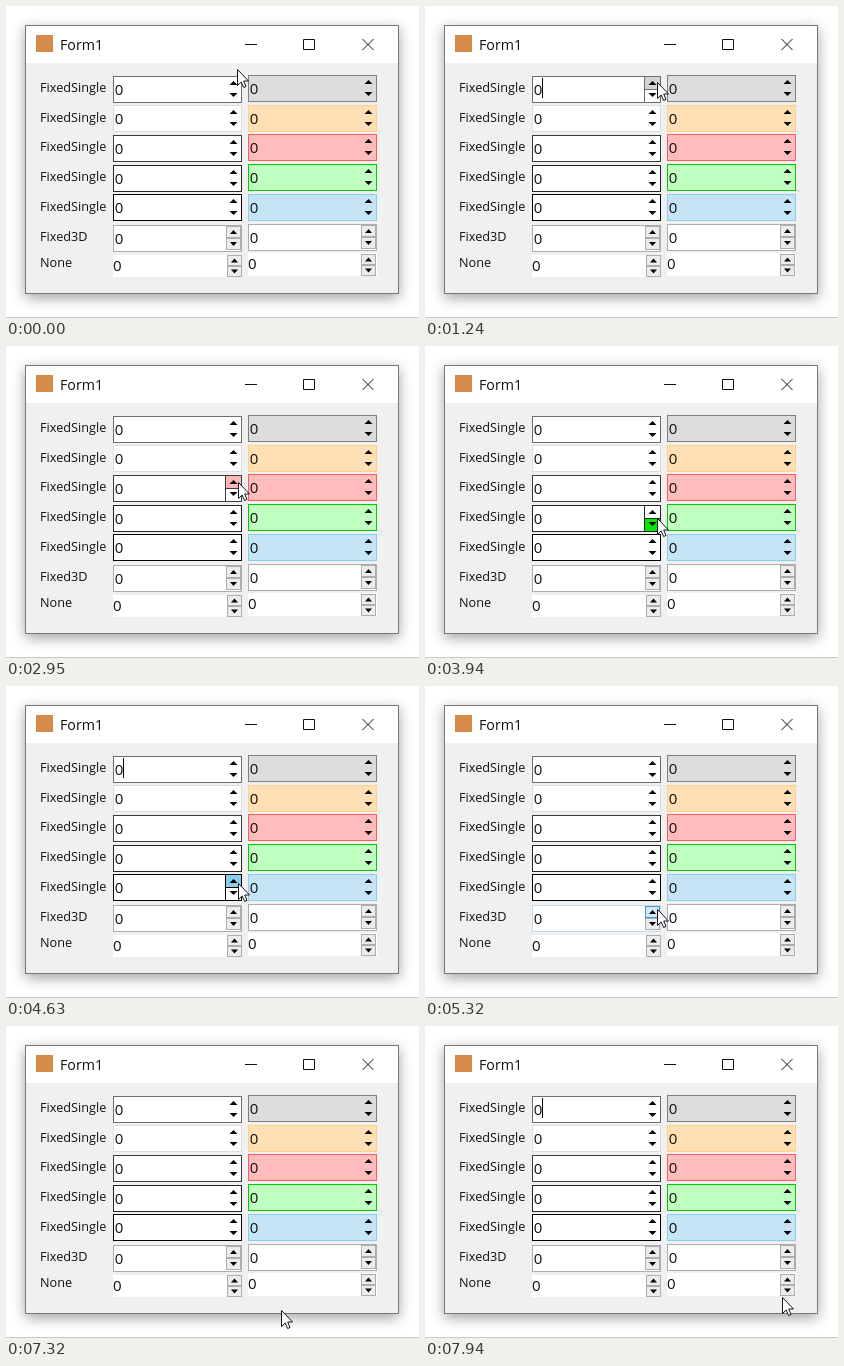
Write an HTML page that moves like this. It is 413x312 px and loops after 8 s.

```html
<!DOCTYPE html>
<html lang="en">
<head>
<meta charset="utf-8">
<title>Form1</title>
<style>
  html, body { margin: 0; width: 100%; height: 100%; overflow: hidden; background: #fff; }
  svg { display: block; width: 413px; height: 312px; }
  text { font-family: "Open Sans", "Noto Sans", sans-serif; fill: #111; }
  .window { filter: drop-shadow(0 4px 7px rgba(0, 0, 0, .36)); }
</style>
</head>
<body>
<svg id="stage" viewBox="0 0 413 312"></svg>
<script>
const LOOP = 8000, STEP = 77, START = 850;
const stage = document.getElementById('stage');

function add(tag, attrs, text) {
  const el = document.createElementNS('http://www.w3.org/2000/svg', tag);
  for (const k in attrs) el.setAttribute(k, attrs[k]);
  if (text) el.textContent = text;
  return stage.appendChild(el);
}
const fillRect = (x, y, width, height, fill) => add('rect', { x, y, width, height, fill });
const box = (x, y, w, h, fill, stroke) =>
  add('rect', { x: x + .5, y: y + .5, width: w - 1, height: h - 1, fill, stroke });
const line = (d, stroke) => add('path', { d, stroke, fill: 'none' });
const label = (x, y, size, text) => add('text', { x, y, 'font-size': size }, text);

// Triangle centred on (x, y); dir is -1 for up, 1 for down
function arrow(x, y, dir, half) {
  add('path', { d: `M${x - half} ${y - 2 * dir}h${2 * half}l${-half} ${4 * dir}z`, fill: '#000' });
}

// label, label baseline, [left y, height, border, highlight], [right y, height, border, back]
const flatRows = [
  ['FixedSingle', 86, [70, 27, '#6e6e6e', '#d3d3d3'], [69, 27, '#808080', '#dcdcdc']],
  ['FixedSingle', 116, [99, 27, '#dcdcdc', '#ffdeb0'], [99, 27, '#ffd08c', '#ffdfb4']],
  ['FixedSingle', 145, [129, 27, '#3c3c3c', '#ffb6b6'], [128, 27, '#ff5c5c', '#ffbcbc']],
  ['FixedSingle', 175, [159, 27, '#242424', '#00e800'], [158, 27, '#00cc00', '#bfffbf']],
  ['FixedSingle', 205, [188, 27, '#000', '#87ceeb'], [188, 27, '#87ceeb', '#c5e5f6']]
];
const hoverables = [];

function flatField(x, [y, h, border, tint], back, live) {
  box(x, y, 129, h, back, border);
  const bx = x + 112, mid = y + 13;
  if (live) {
    const top = fillRect(bx, y + 1, 16, 12, tint);
    const bottom = fillRect(bx, mid, 16, h - 14, tint);
    const rule = line(`M${bx + .5} ${y + 1}v${h - 2}M${bx} ${mid + .5}h16`, border);
    hoverables.push({
      y0: y + 1, mid, y1: y + h - 1,
      set(part) {
        top.style.display = part === 1 ? '' : 'none';
        bottom.style.display = part === 2 ? '' : 'none';
        rule.style.display = part ? '' : 'none';
      }
    });
  }
  arrow(x + 120.5, y + 7, -1, 4);
  arrow(x + 120.5, y + 19, 1, 4);
  label(x + 1.7, y + 18.5, 15, '0');
}

function systemField(x, y, h, bx, by, bh, bordered, live) {
  const frame = bordered ? box(x, y, 129, h, '#fff', '#abadb3') : fillRect(x, y, 129, h, '#fff');
  const buttons = [0, 1].map(i => {
    const b = box(bx, by + i * bh, 15, bh, '#ececec', '#adadad');
    arrow(bx + 7.5, by + i * bh + bh / 2, i ? 1 : -1, 3.5);
    return b;
  });
  label(x + (bordered ? 1.7 : 0), y + (bordered ? 18.5 : 15.5), 15, '0');
  if (!live) return;
  hoverables.push({
    y0: by, mid: by + bh, y1: by + 2 * bh,
    set(part) {
      buttons.forEach((b, i) => {
        const on = part === i + 1;
        b.setAttribute('fill', on ? '#d3e8f8' : '#ececec');
        b.setAttribute('stroke', on ? '#4a94d0' : '#adadad');
      });
      if (bordered) frame.setAttribute('stroke', part ? '#c5daed' : '#abadb3');
    }
  });
}

fillRect(0, 311, 413, 1, '#c9c9c9');
box(19, 19, 374, 269, '#f0f0f0', '#777').setAttribute('class', 'window');
fillRect(20, 20, 372, 37, '#fff');
fillRect(30, 29, 17, 17, '#d58a4a');
label(54, 44, 14.2, 'Form1');
line('M239 38.5h12M297.5 33.5h11v10h-11zM356.5 33l11 11M367.5 33l-11 11', '#111');

for (const [name, base, left, right] of flatRows) {
  label(34, base, 12.7, name);
  flatField(107, left, '#fff', true);
  flatField(242, right, right[3], false);
}
label(34, 235, 12.7, 'Fixed3D');
systemField(107, 219, 27, 220, 220, 12, true, true);
systemField(242, 218, 27, 355, 219, 12, true, false);
label(34, 261, 12.7, 'None');
systemField(107, 249, 22, 221, 249, 11, false, true);
systemField(242, 247, 23, 355, 248, 11, false, false);

const caret = fillRect(117, 72, 1, 20, '#000');
const cursor = add('path', {
  d: 'M.5 .5V16.5L4.2 13L6.6 18.5L9 17.5L6.7 12H11.5Z', fill: '#fff', stroke: '#15151f'
});

// time, x, y
const path = [
  [773, 231, 63], [1630, 232, 87], [2010, 232, 101], [2490, 232, 120], [2930, 232, 136],
  [3320, 232, 149], [3930, 232, 172], [4170, 232, 182], [5020, 232, 211], [5316, 232, 223],
  [5860, 232, 244], [6394, 230, 263], [6625, 230, 270], [6933, 230, 270], [7240, 262, 283],
  [7400, 288, 286], [7600, 320, 286], [7780, 346, 282], [7934, 357, 271]
];

function pointAt(t) {
  if (t <= path[0][0]) return path[0].slice(1);
  const i = path.findIndex(p => p[0] >= t);
  if (i < 0) return path[path.length - 1].slice(1);
  const a = path[i - 1], b = path[i], k = (t - a[0]) / (b[0] - a[0]);
  return [1, 2].map(n => Math.round(a[n] + (b[n] - a[n]) * k));
}

function draw(t) {
  const [x, y] = pointAt(START + Math.floor((t - START) / STEP) * STEP);
  cursor.setAttribute('transform', `translate(${x} ${y})`);
  for (const h of hoverables) {
    const inside = x >= 219 && x < 236 && y >= h.y0 && y < h.y1;
    h.set(inside ? (y < h.mid ? 1 : 2) : 0);
  }
  const blink = (t - 150) % 1060;
  caret.style.display = t >= 150 && blink < 550 ? '' : 'none';
}

const begin = performance.now();
function tick() {
  draw((performance.now() - begin) % LOOP);
  requestAnimationFrame(tick);
}
tick();
</script>
</body>
</html>
```
